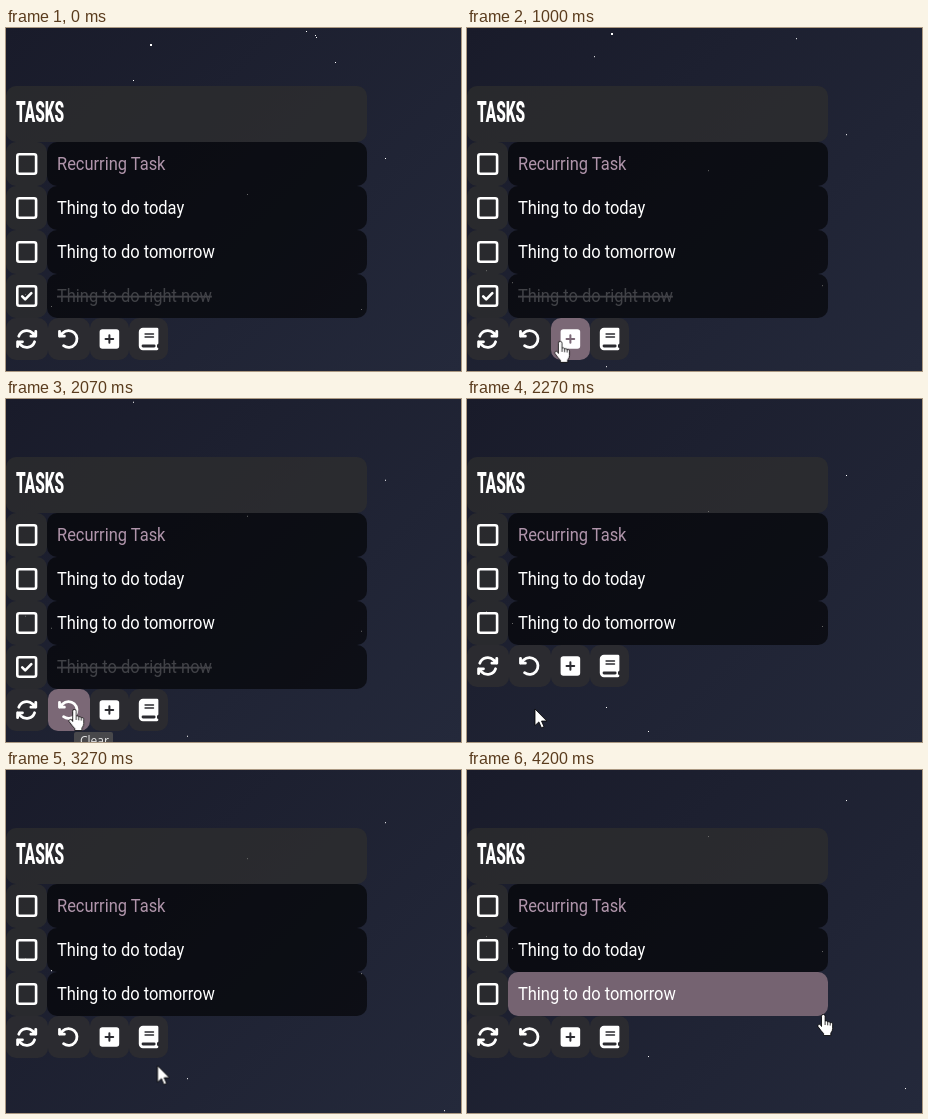
An HTML page for the animation above (4.27 s loop, 455 by 343 pixels).

```html
<!DOCTYPE html>
<html lang="en">
<head>
<meta charset="utf-8">
<title>Tasks</title>
<style>
  :root { --loop: 4270ms; --panel: #2b2b30; --hot: #7b6876; }
  html, body { margin: 0; width: 100%; height: 100%; overflow: hidden; background: #1f2232; }
  svg.stage {
    display: block; width: 100vw; height: 100vh;
    background: linear-gradient(135deg, #191b2a, #24293b);
  }

  .pane { fill: rgba(48, 47, 46, .7); }
  .row { fill: rgba(0, 0, 0, .6); }
  .label { font: 18.7px Roboto, "Liberation Sans", sans-serif; fill: #fff; }
  .label text, .title { transform-box: fill-box; transform: scaleX(.88); }
  .label .repeat { fill: #b095ab; }
  .label .done { fill: #414247; text-decoration: line-through; }
  .title { font: 900 29.5px Roboto, "Liberation Sans", sans-serif; fill: #fff; transform: scaleX(.52); }
  .tip text { font: 12px "Open Sans", sans-serif; fill: #e4e4e4; }

  .line { fill: none; stroke: #fff; stroke-linecap: round; stroke-linejoin: round; }
  .button { color: var(--panel); }
  .cut { fill: none; stroke: currentColor; stroke-linecap: round; }

  /* Motion */
  .near, .far { shape-rendering: crispEdges; fill: #fff; }
  .far { animation: far var(--loop) linear infinite; }
  .near { animation: near var(--loop) linear infinite; }
  @keyframes far { to { transform: translateY(-101.6px); } }
  @keyframes near { to { transform: translateY(-47px); } }

  .cleared { animation: cleared var(--loop) step-end infinite; }
  @keyframes cleared { 0% { opacity: 1; } 51.4%, 100% { opacity: 0; } }

  .bar { animation: bar var(--loop) step-end infinite; }
  @keyframes bar { 0% { transform: none; } 51.4%, 100% { transform: translateY(-44px); } }

  .add { animation: add var(--loop) step-end infinite; }
  @keyframes add { 0%, 24.4%, 100% { color: var(--panel); } 11.2% { color: var(--hot); } }

  .undo { animation: undo var(--loop) step-end infinite; }
  @keyframes undo { 0%, 51.4%, 100% { color: var(--panel); } 24.4% { color: var(--hot); } }

  .row.last { animation: rowHot var(--loop) step-end infinite; }
  @keyframes rowHot { 0% { fill: rgba(0, 0, 0, .6); } 97.1%, 100% { fill: #756371; } }

  .tip { animation: tip var(--loop) linear infinite; }
  @keyframes tip { 0%, 36.4% { opacity: 0; } 39.4%, 51.39% { opacity: 1; } 51.4%, 100% { opacity: 0; } }

  .cursor { animation: move var(--loop) linear infinite; }
  @keyframes move {
    0%, 8.2% { transform: translate(112px, 346px); }
    14% { transform: translate(102px, 321px); }
    23.3% { transform: translate(94px, 313px); }
    26.4% { transform: translate(69px, 310px); }
    53.2% { transform: translate(68px, 310px); animation-timing-function: ease-in-out; }
    65.5% { transform: translate(120px, 309px); }
    75% { transform: translate(149px, 299px); }
    89% { transform: translate(171px, 270px); animation-timing-function: ease-in-out; }
    97.9%, 100% { transform: translate(356px, 244px); }
  }
  .arrow { animation: arrow var(--loop) step-end infinite; }
  .hand { animation: hand var(--loop) step-end infinite; }
  @keyframes arrow { 0%, 51.4% { opacity: 1; } 11.2%, 97.1%, 100% { opacity: 0; } }
  @keyframes hand { 0%, 51.4% { opacity: 0; } 11.2%, 97.1%, 100% { opacity: 1; } }
</style>
</head>
<body>
<svg class="stage" viewBox="0 0 455 343">
  <defs>
    <rect id="cell" class="pane" width="41" height="44" rx="10"/>
    <rect id="slot" x="41" width="320" height="44" rx="10"/>
    <rect id="box" class="line" x="11.3" y="12.3" width="18.8" height="19.4" rx="2" stroke-width="2.6"/>
    <path id="spin" class="line" stroke-width="64" d="M75 192A192 192 0 0 1 392 120L464 192M464 80V192H352"/>
  </defs>

  <g class="far" id="stars"></g>
  <rect class="near" x="144" y="15.5" width="2" height="2"/>

  <rect class="pane" y="58" width="361" height="56" rx="10"/>
  <text class="title" x="10" y="94.3">TASKS</text>

  <g class="label">
    <g transform="translate(0 114)">
      <use href="#cell"/><use href="#slot" class="row"/><use href="#box"/>
      <text class="repeat" x="51" y="28.3">Recurring Task</text>
    </g>
    <g transform="translate(0 158)">
      <use href="#cell"/><use href="#slot" class="row"/><use href="#box"/>
      <text x="51" y="28.3">Thing to do today</text>
    </g>
    <g transform="translate(0 202)">
      <use href="#cell"/><use href="#slot" class="row last"/><use href="#box"/>
      <text x="51" y="28.3">Thing to do tomorrow</text>
    </g>
    <g class="cleared">
      <g transform="translate(0 246)">
        <use href="#cell"/><use href="#slot" class="row"/><use href="#box"/>
        <path class="line" stroke-width="2.6" d="M16.2 22.3L19.2 25.3L25.3 19.1"/>
        <text class="done" x="51" y="28.3">Thing to do right now</text>
      </g>
    </g>
  </g>

  <g class="bar">
    <g class="button">
      <rect y="290" width="42" height="42" rx="10" fill="currentColor"/>
      <g transform="translate(9.5 299.8) scale(.0437)">
        <use href="#spin"/><use href="#spin" transform="rotate(180 256 256)"/>
      </g>
    </g>
    <g class="button undo">
      <rect x="42" y="290" width="42" height="42" rx="10" fill="currentColor"/>
      <path class="line" stroke-width="64" transform="translate(51.4 299.8) scale(.0437)"
        d="M48 80V192H160M48 192L120 120A192 192 0 1 1 141 410"/>
    </g>
    <g class="button add">
      <rect x="84" y="290" width="39" height="42" rx="10" fill="currentColor"/>
      <g transform="translate(93.6 299.8) scale(.0437)">
        <rect y="32" width="448" height="448" rx="64" fill="#fff"/>
        <path class="cut" stroke-width="46" d="M224 168V344M136 256H312"/>
      </g>
    </g>
    <g class="button">
      <rect x="123" y="290" width="39" height="42" rx="10" fill="currentColor"/>
      <g transform="translate(132.8 299.8) scale(.0437)">
        <path fill="#fff" d="M96 0H416a32 32 0 0 1 32 32V352a32 32 0 0 1-32 32v64a32 32 0 0 1 0 64H96a96 96 0 0 1-96-96V96A96 96 0 0 1 96 0Z"/>
        <path class="cut" stroke-width="64" d="M96 416H352"/>
        <path class="cut" stroke-width="34" d="M144 144H336M144 208H336"/>
      </g>
    </g>
  </g>

  <g class="tip">
    <rect x="68" y="333" width="39" height="20" rx="2" fill="#48484b"/>
    <text x="74" y="345.5">Clear</text>
  </g>

  <g class="cursor" fill="#fff" stroke="#000" stroke-width=".8" stroke-linejoin="round">
    <path class="arrow" d="M0 0V16.5L3.9 12.9L6.4 18.8L9 17.7L6.5 12H11.8Z"/>
    <g class="hand">
      <g transform="translate(-6 0)">
        <path d="M4.5 12.5V2.2a1.8 1.8 0 0 1 3.6 0V7.2a1.6 1.6 0 0 1 2.6.9 1.6 1.6 0 0 1 2.5.8 1.5 1.5 0 0 1 2.4 1.3V14.5Q15.6 17 13.8 19V21.5H6.6V19.5Q4.5 17.5 1 12.6a1.6 1.6 0 0 1 2.3-2Z"/>
        <path fill="none" d="M8.1 7.2V11M10.7 8.1V11.3M13.2 9V11.6"/>
      </g>
    </g>
  </g>
</svg>
<script>
  // Small stars, placed where they stand when the loop begins.
  const stars = [
    [379, 130], [127, 52], [329, 34], [300, 3], [309, 7], [310, 9], [241, 166],
    [45, 278], [355, 281], [19, 266], [139, 362], [181, 386], [438, 418]
  ];
  const sky = document.getElementById("stars");
  for (const [x, y] of stars) {
    const dot = document.createElementNS(sky.namespaceURI, "rect");
    const size = { x, y: y + .4, width: 1, height: 1 };
    for (const key in size) dot.setAttribute(key, size[key]);
    sky.append(dot);
  }
</script>
</body>
</html>
```
